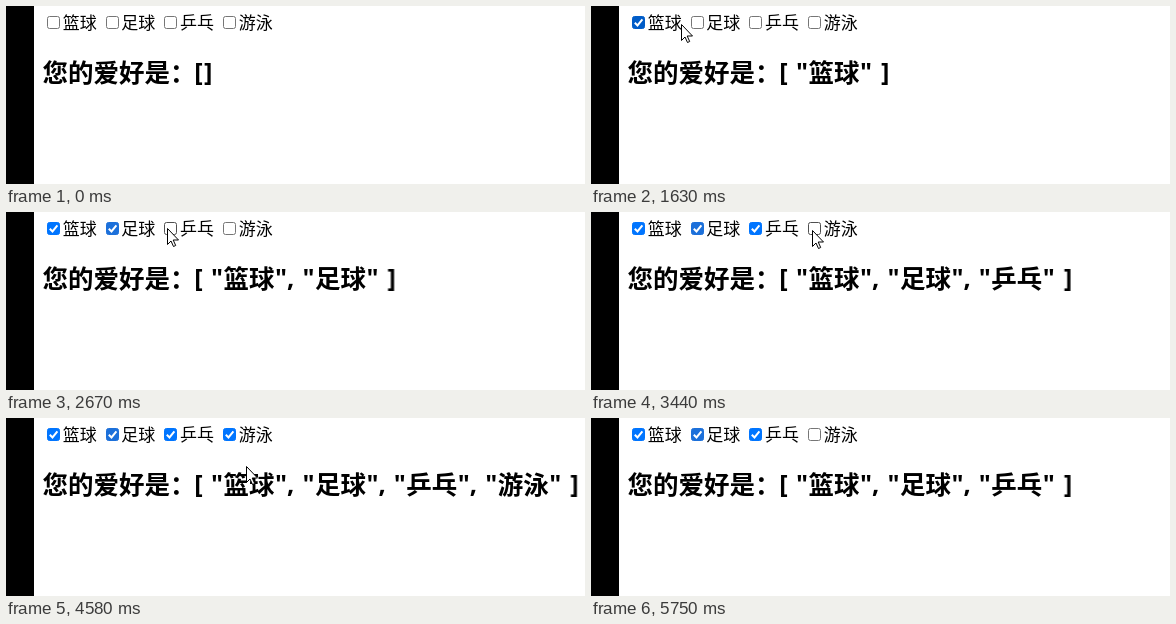
Animation of 579 by 178 pixels, one loop 6280 ms. Source, as an HTML page:

```html
<!DOCTYPE html>
<html lang="zh-CN">
<head>
<meta charset="utf-8">
<title>Checkbox list</title>
<style>
  html, body { margin: 0; width: 100%; height: 100%; overflow: hidden; background: #fff; }
  svg { display: block; }
  text { font: 17px "Noto Sans CJK SC", "Noto Sans CJK", sans-serif; }
  .title { font-size: 25.5px; font-weight: 700; }
  .latin { font-family: "Open Sans", "Noto Sans", sans-serif; }
</style>
</head>
<body>
<svg id="stage" width="579" height="178" viewBox="0 0 579 178">
  <rect width="28" height="178"/>
  <text class="title" x="36.5" y="76">您的爱好是：</text>
  <text class="title latin" x="188.2" y="75">[</text>
</svg>
<script>
const LOOP = 6280;
const PITCH = 91.4;
const stage = document.getElementById('stage');

const OFF = { fill: '#fff', stroke: '#767676' };
const HOVER = { fill: '#fff', stroke: '#4f4f4f' };
const solid = color => ({ fill: color, stroke: color });
const ON = solid('#0075ff');
const ON_HOVER = solid('#005cc8');
const ON_DULL = solid('#1c70da');

// Each hobby: label, times [from, to] when selected, and checkbox looks over time.
const hobbies = [
  { name: '篮球', span: [1290, LOOP],
    looks: [[0, OFF], [620, HOVER], [1290, ON_HOVER], [1700, ON]] },
  { name: '足球', span: [1920, LOOP],
    looks: [[0, OFF], [1850, HOVER], [1920, ON_HOVER], [2330, ON_DULL]] },
  { name: '乒乓', span: [2740, LOOP],
    looks: [[0, OFF], [2330, HOVER], [2740, ON_HOVER], [3310, ON]] },
  { name: '游泳', span: [4250, 4920],
    looks: [[0, OFF], [3240, HOVER], [4250, ON_HOVER], [4460, ON],
            [4780, ON_HOVER], [4920, HOVER], [5330, OFF]] },
];

// Pointer tip: time, x, y, number of jumps to the next point.
const pointerPath = [
  [130, 168, 94, 2], [270, 110, 55, 2], [410, 68, 28, 4], [690, 45, 15, 1],
  [1360, 45, 15, 4], [1630, 90, 18, 3], [1850, 103, 16, 1],
  [1990, 103, 16, 6], [2400, 161, 16, 1],
  [2810, 161, 16, 6], [3240, 221, 22, 1], [3440, 221, 18, 1],
  [4320, 221, 18, 3], [4510, 240, 48, 1], [4650, 240, 48, 3], [4850, 221, 18, 1],
  [5120, 221, 18, 6], [5540, 232, 38, 1], [5610, 330, 100, 1], [5680, 456, 165, 1],
];

function add(parent, tag, attrs, text = '') {
  const el = document.createElementNS('http://www.w3.org/2000/svg', tag);
  for (const key in attrs) el.setAttribute(key, attrs[key]);
  el.textContent = text;
  parent.append(el);
  return el;
}

function loop(el, frames) {
  el.animate(frames, { duration: LOOP, iterations: Infinity });
}

// Plays a table of [time, style] with hard changes.
function hold(el, table) {
  const frames = table.map(([time, style]) => ({ ...style, offset: time / LOOP, easing: 'step-end' }));
  loop(el, [...frames, { ...table.at(-1)[1], offset: 1 }]);
}

function showBetween(el, [from, to]) {
  const table = [[0, { opacity: 0 }], [from, { opacity: 1 }]];
  if (to < LOOP) table.push([to, { opacity: 0 }]);
  hold(el, table);
}

const latin = (parent, x, text) => add(parent, 'text', { class: 'title latin', x, y: 75 }, text);

hobbies.forEach(({ name, span, looks }, i) => {
  const x = 41 + i * 58.67;
  const left = Math.round(x);
  const box = add(stage, 'rect', { x: left + 0.5, y: 10.5, width: 12, height: 12, rx: 2 });
  hold(box, looks);
  const tick = add(stage, 'path', {
    d: `M${left + 2.8} 16.7l2.7 2.7 4.9-6`, fill: 'none', stroke: '#fff', 'stroke-width': 2,
  });
  showBetween(tick, span);
  add(stage, 'text', { x: x + 15.7, y: 23.4 }, name);

  const item = add(stage, 'g', { transform: `translate(${i * PITCH})` });
  if (i) latin(item, 189.6, ',');
  latin(item, 205, '"');
  add(item, 'text', { class: 'title', x: 217.5, y: 76 }, name);
  latin(item, 269, '"');
  showBetween(item, span);
});

const bracketAt = x => ({ transform: `translate(${x}px, 0px)` });
const afterItems = count => bracketAt(290 + (count - 1) * PITCH);
hold(latin(stage, 0, ']'), [
  [0, bracketAt(198)], [1290, afterItems(1)], [1920, afterItems(2)],
  [2740, afterItems(3)], [4250, afterItems(4)], [4920, afterItems(3)],
]);

const pointer = add(stage, 'g', {});
add(pointer, 'path', {
  d: 'M.5 .5V16.5L4 13 6.5 18.5 8.7 17.5 6.2 12H11.5Z', fill: '#fff', stroke: '#000',
});
showBetween(pointer, [130, 5750]);
const at = (x, y) => ({ transform: `translate(${x}px, ${y}px)` });
const [, firstX, firstY] = pointerPath[0];
const [, lastX, lastY] = pointerPath.at(-1);
loop(pointer, [
  { ...at(firstX, firstY), offset: 0 },
  ...pointerPath.map(([time, x, y, jumps]) => ({
    ...at(x, y), offset: time / LOOP, easing: `steps(${jumps}, end)`,
  })),
  { ...at(lastX, lastY), offset: 1 },
]);
</script>
</body>
</html>
```
